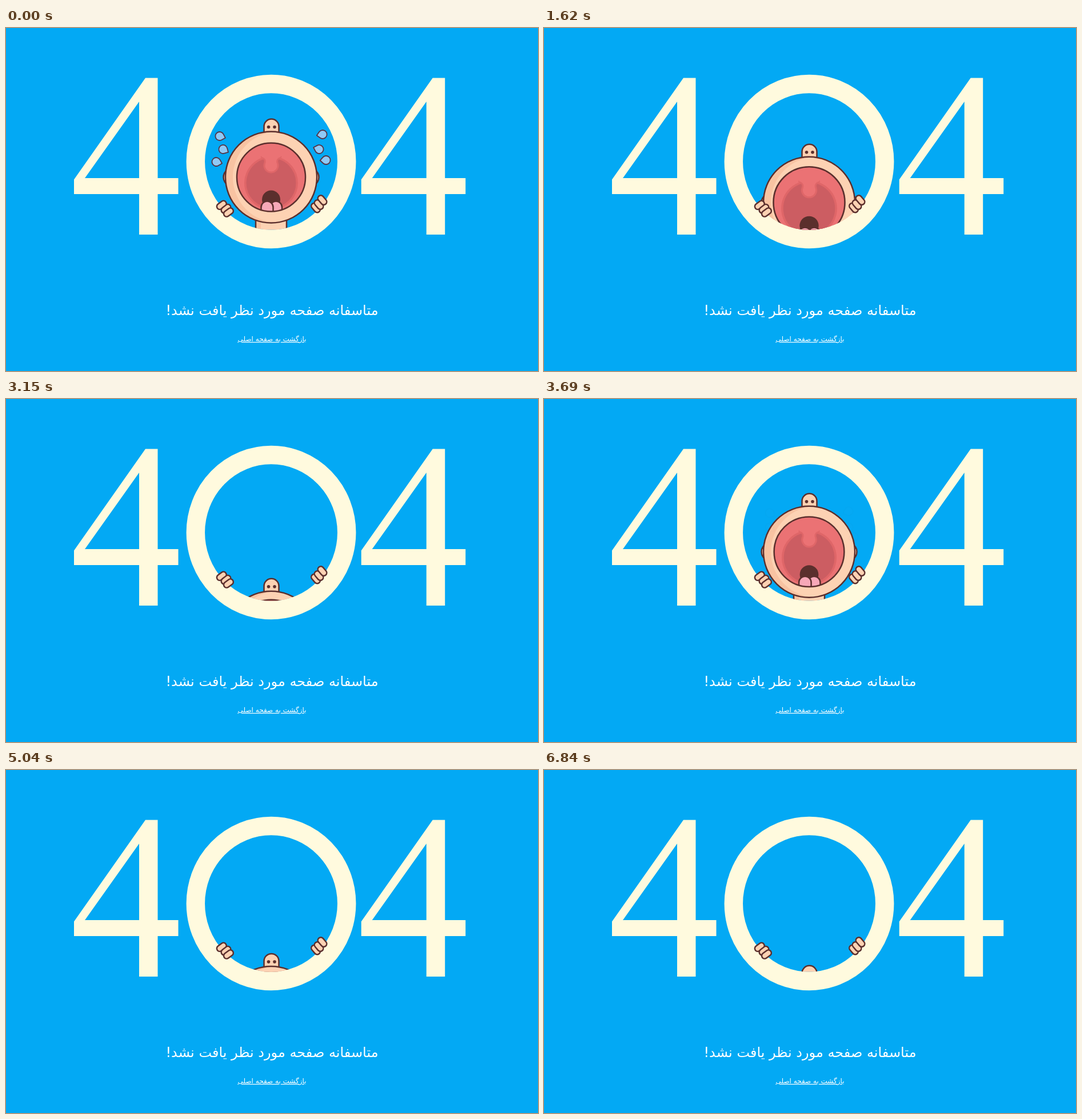
Animation of 931 by 601 pixels, one loop 6940 ms. Source, as an HTML page:

```html
<!DOCTYPE html>
<html lang="fa">
<head>
<meta charset="utf-8">
<title>404</title>
<style>
  html, body { margin: 0; width: 100%; height: 100%; overflow: hidden; background: #03a9f4; }
  svg { display: block; }
  text { font-family: "DejaVu Sans", sans-serif; fill: #fff; direction: rtl; text-anchor: middle; }
  .line { stroke: #5b2f2d; stroke-width: 2.5; }
  .skin { fill: #fdd2b3; }
  .shade { fill: #f8c3a2; }
  .dark { fill: #5b2f2d; }
  .cream { fill: #fffade; }
  .tear { fill: #8fc9f6; stroke: #573344; stroke-width: 1.8; stroke-linejoin: round; }
</style>
</head>
<body>
<svg width="931" height="601" viewBox="0 0 931 601">
  <defs>
    <clipPath id="hole"><ellipse cx="464" cy="233.7" rx="117" ry="120"/></clipPath>
    <clipPath id="headClip"><circle r="80"/></clipPath>
    <clipPath id="mouthClip"><circle r="60"/></clipPath>
    <path id="four" class="cream" fill-rule="evenodd"
      d="M244 87.500H265.500V263H301.500V291H265.500V362H233V291H119V265.500ZM233 129L138 263H233Z"/>
    <rect id="finger" class="skin line" x="-9.200" y="-5.200" width="18.400" height="10.400" rx="5.200"/>
  </defs>

  <use href="#four"/>
  <use href="#four" x="502.700"/>
  <ellipse cx="464" cy="234" rx="132.200" ry="135.900" fill="none" stroke="#fffade" stroke-width="32.500"/>

  <g clip-path="url(#hole)">
    <g id="body">
      <g transform="translate(464 261)">
        <path class="skin" d="M-27 60H27V200H-27Z"/>
        <path class="shade" d="M-27 60H-18V200H-27Z"/>
        <path class="line" fill="none" d="M-27 60V200M27 60V200"/>
        <ellipse class="shade line" cx="-75" rx="8.500" ry="12"/>
        <ellipse class="skin line" cx="75" rx="8.500" ry="12"/>
        <path class="skin line" d="M-12.500 -70V-89A13 13 0 0 1 13.500 -89V-70Z"/>
        <circle class="dark" cx="-4.500" cy="-88" r="2.800"/>
        <circle class="dark" cx="6" cy="-88" r="2.800"/>
        <circle class="shade" r="80"/>
        <circle class="skin" cx="13" r="80" clip-path="url(#headClip)"/>
        <circle class="line" r="80" fill="none"/>
        <g id="mouth">
          <circle r="60" fill="#eb7274"/>
          <circle cy="10" r="47" fill="#df6668"/>
          <circle cy="10" r="43.500" fill="#cc5d62"/>
          <path id="uvula" fill="#eb7274" d="M-18 -36Q-8 -32 -11.500 -24A12 12 0 1 0 11.500 -24Q8 -32 18 -36"
            stroke="#df6668" stroke-width="3"/>
          <path fill="#eb7274" d="M-17 -40H17V-36Q8 -33 9 -26H-9Q-8 -33 -17 -36Z"/>
          <g clip-path="url(#mouthClip)">
            <circle class="dark" cy="39" r="16"/>
            <g class="line" fill="#f7a8b8">
              <path d="M-2 65V52.500A10.500 10.500 0 0 1 19 52.500V65Z"/>
              <path d="M-17.500 65V52.500A10.500 10.500 0 0 1 3.500 52.500V65Z"/>
            </g>
          </g>
          <circle class="line" r="60" fill="none"/>
        </g>
      </g>
    </g>
  </g>

  <g id="hands">
    <use href="#finger" transform="translate(377.300 310.300) rotate(-36)"/>
    <use href="#finger" transform="translate(385 316.700) rotate(-38)"/>
    <use href="#finger" transform="translate(389.400 323) rotate(-36)"/>
    <use href="#finger" transform="translate(542 315) rotate(50)"/>
    <use href="#finger" transform="translate(547.500 309.500) rotate(50)"/>
    <use href="#finger" transform="translate(553.500 301.500) rotate(50)"/>
  </g>

  <g id="tears"></g>

  <text x="465.500" y="503" font-size="24">متاسفانه صفحه مورد نظر یافت نشد!</text>
  <text x="465.500" y="549" font-size="12" text-decoration="underline">بازگشت به صفحه اصلی</text>
</svg>
<script>
const LOOP = 6940, CYCLE = 1925;
const byId = id => document.getElementById(id);

// Smooth curve through the keys that never overshoots them.
function track(times, values) {
  const slope = i => (values[i + 1] - values[i]) / (times[i + 1] - times[i]);
  const tangent = i => {
    if (i === 0) return slope(0);
    if (i === times.length - 1) return slope(i - 1);
    const a = slope(i - 1), b = slope(i);
    return a * b > 0 ? 2 * a * b / (a + b) : 0;
  };
  return t => {
    let i = 0;
    while (i < times.length - 2 && t > times[i + 1]) i++;
    const h = times[i + 1] - times[i];
    const u = Math.min(1, Math.max(0, (t - times[i]) / h)), v = 1 - u;
    return v * v * (1 + 2 * u) * values[i] + u * u * (3 - 2 * u) * values[i + 1]
      + h * u * v * (v * tangent(i) - u * tangent(i + 1));
  };
}

const drop = track(
  [0, 130, 255, 380, 435, 495, 720, 770, 850, 925, 985, 1065, 1225, 1620, 1710, 1800, 1925],
  [0.5, 0, 3, 24, 43, 66, 164, 192, 205, 205, 195, 184, 156, 45, 17, 3.5, 0.5]);
const mouthRadius = track([0, 255, 380, 600, 1225, 1620, 1925], [60, 66.5, 68.5, 69.5, 65, 62.5, 60]);

const tearTimes = [-160, 0, 255, 380, 510];
const tearFade = track([-160, -70, 300, 520], [0, 1, 1, 0]);
const tearPaths = [
  { x: [395, 374, 347, 336, 318], y: [193, 189, 190, 198, 209], turn: [30, 17, 2, -15, -30], lift: 3, twist: 7 },
  { x: [395, 380, 356, 351, 347], y: [218, 212, 211, 215, 222], turn: [40, 30, 25, 0, -15], lift: 0, twist: 48 },
  { x: [386, 368, 348, 350, 354], y: [238, 234, 235, 241, 250], turn: [30, 15, 0, -17, -30], lift: 3, twist: 12 }
];
const tears = tearPaths.flatMap(path => [false, true].map(right => {
  const node = document.createElementNS("http://www.w3.org/2000/svg", "path");
  node.setAttribute("class", "tear");
  node.setAttribute("d", "M10.5 0L5.4 5.2A7.5 7.5 0 1 1 5.4 -5.2Z");
  byId("tears").append(node);
  const [x, y, turn] = [path.x, path.y, path.turn].map(values => track(tearTimes, values));
  return t => node.setAttribute("transform", right
    ? `translate(928 0) scale(-1 1) translate(${x(t)} ${y(t) - path.lift}) rotate(${turn(t) - path.twist})`
    : `translate(${x(t)} ${y(t)}) rotate(${turn(t)})`);
}));

function draw(now) {
  const phase = (now % LOOP) % CYCLE;
  const tearPhase = phase > 1700 ? phase - CYCLE : phase;
  const shift = `translate(0 ${drop(phase)})`;
  byId("body").setAttribute("transform", shift);
  byId("mouth").setAttribute("transform", `scale(${mouthRadius(phase) / 60})`);
  byId("tears").setAttribute("transform", shift);
  byId("tears").setAttribute("opacity", tearFade(tearPhase));
  tears.forEach(place => place(tearPhase));
}

const start = performance.now();
function tick() {
  draw(performance.now() - start);
  requestAnimationFrame(tick);
}
tick();
</script>
</body>
</html>
```
